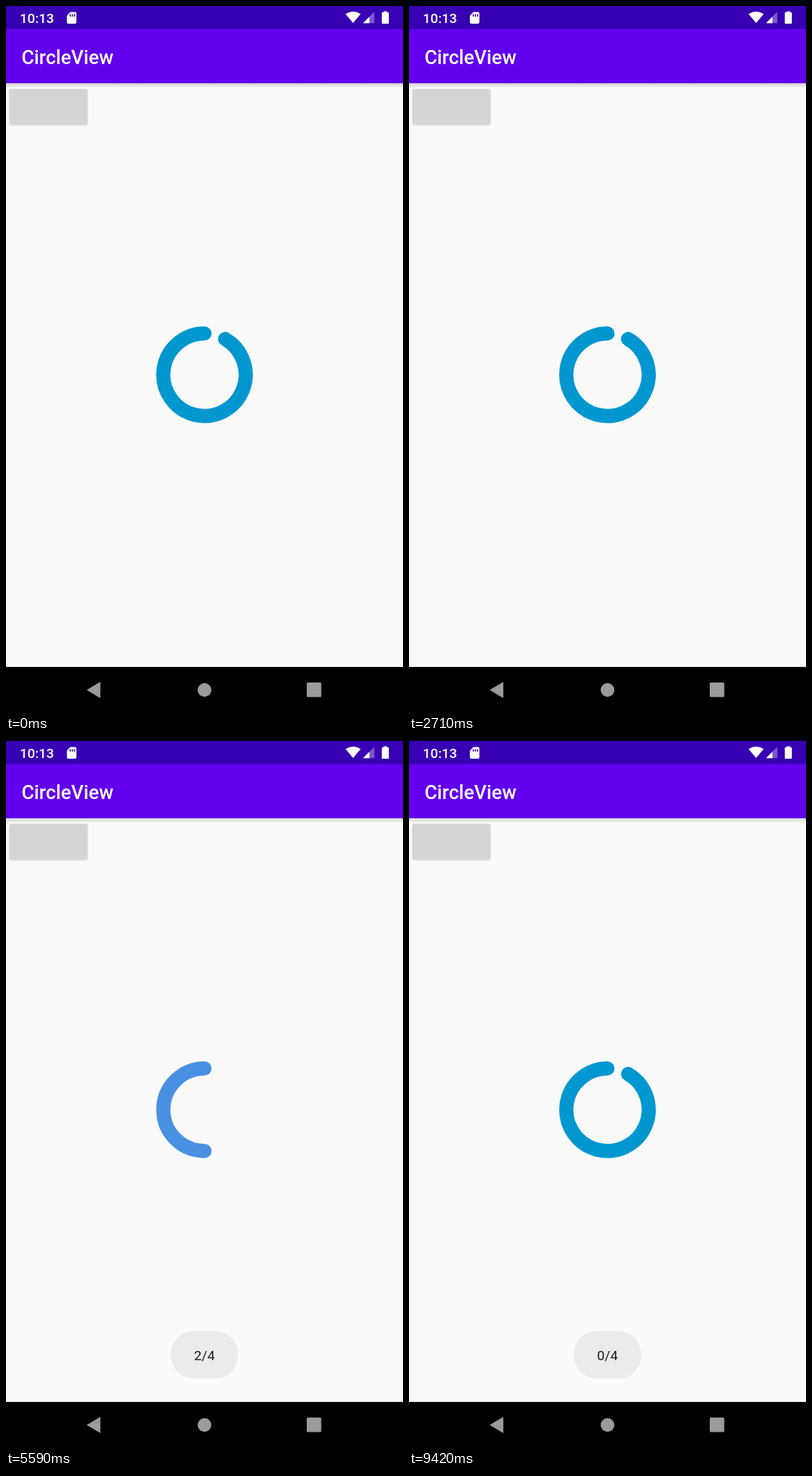
Animation of 561 by 998 pixels, one loop 9500 ms. Source, as an HTML page:

```html
<!DOCTYPE html>
<html lang="en">
<head>
<meta charset="utf-8">
<title>CircleView</title>
<style>
  html, body { margin: 0; width: 100%; height: 100%; overflow: hidden; background: #fafafa; }
  svg { display: block; width: 561px; height: 998px; font-family: Roboto, sans-serif; }
</style>
</head>
<body>
<svg viewBox="0 0 561 998">
  <defs>
    <linearGradient id="shade" x2="0" y2="1">
      <stop stop-color="#000" stop-opacity=".16"/>
      <stop offset="1" stop-color="#000" stop-opacity="0"/>
    </linearGradient>
    <filter id="soft" x="-10%" y="-20%" width="120%" height="140%">
      <feDropShadow dx="0" dy="1.3" stdDeviation="1.3" flood-opacity=".25"/>
    </filter>
  </defs>

  <rect width="561" height="998" fill="#fafafa"/>
  <rect y="109" width="561" height="7" fill="url(#shade)"/>
  <rect y="32" width="561" height="77" fill="#6200ee"/>
  <rect width="561" height="32.5" fill="#3700b3"/>

  <g fill="#fff">
    <text x="19.5" y="24" font-size="19.1" font-weight="500">10:13</text>
    <path d="M91 8.5H97.5Q99.5 8.5 99.5 10.5V23Q99.5 25 97.5 25H88Q86 25 86 23V13.5Z"/>
    <path d="M90.8 11.5v3.5M93.8 11.5v3.5M96.8 11.5v3.5" stroke="#3700b3" stroke-width="1.5"/>
    <path d="M490.5 24L479.8 11.3Q490.5 4 501.2 11.3Z"/>
    <path d="M504.5 24.3L520.5 8.3V24.3Z" opacity=".35"/>
    <path d="M504.5 24.3L513.5 15.3V24.3Z"/>
    <path d="M533.5 9V7.5H538.5V9H540Q541 9 541 10V24Q541 25 540 25H532Q531 25 531 24V10Q531 9 532 9Z"/>
    <text x="22" y="81.5" font-size="27.3" font-weight="500">CircleView</text>
  </g>

  <rect id="button" x="5" y="117" width="110" height="49.5" rx="2.5" fill="#d5d5d5" filter="url(#soft)"/>
  <path id="ring" fill="none" stroke-linecap="round"/>

  <g id="toast" text-anchor="middle" font-size="19.1">
    <rect x="233" y="833" width="95" height="67" rx="32" fill="#ebebec"/>
    <text id="oldText" x="280.5" y="874" fill="#1c1c1c"/>
    <text id="newText" x="280.5" y="874" fill="#1c1c1c"/>
  </g>

  <rect y="933" width="561" height="65"/>
  <g fill="#9b9b9b">
    <path d="M114 965.5L133.3 954V977Z"/>
    <circle cx="280.5" cy="965.5" r="9.7"/>
    <rect x="425" y="955" width="20.5" height="20.5" rx="1.5"/>
  </g>
</svg>

<script>
const LOOP = 9500, GROW = 800, CX = 280.5, CY = 520.5, OUTER = 68.2, STROKE = 20;
const steps = [
  { at: -GROW, sweep: 330, color: '#0097d0', label: '' },
  { at: 3440, sweep: 90, color: '#ff0000', label: '1/4' },
  { at: 4720, sweep: 180, color: '#4a90e2', label: '2/4' },
  { at: 6135, sweep: 270, color: '#40c4ff', label: '3/4' },
  { at: 7412, sweep: 330, color: '#0097d0', label: '0/4' }
];
const [button, ring, toast, oldText, newText] =
  ['button', 'ring', 'toast', 'oldText', 'newText'].map(id => document.getElementById(id));

const clamp = x => Math.min(1, Math.max(0, x));
const overshoot = t => (t - 1) ** 2 * (3 * (t - 1) + 2) + 1;

function arcPath(r, degrees) {
  const point = deg => {
    const a = deg * Math.PI / 180;
    return `${CX - r * Math.sin(a)} ${CY - r * Math.cos(a)}`;
  };
  const half = `A${r} ${r} 0 0 0 `;
  const end = Math.min(degrees, 360);
  return `M${point(0)}${half}${point(end / 2)}${half}${point(end)}`;
}

function drawRing(step, t) {
  const f = overshoot(clamp((t - step.at) / GROW));
  const width = STROKE * f;
  ring.setAttribute('d', arcPath(OUTER - width / 2, step.sweep * f));
  ring.setAttribute('stroke', step.color);
  ring.setAttribute('stroke-width', width);
}

function drawToast(index, t) {
  const fade = clamp((t - steps[index].at - 90) / 270);
  toast.style.opacity = index === 0 ? 0 : index === 1 ? fade : 1;
  oldText.textContent = index > 1 ? steps[index - 1].label : '';
  newText.textContent = steps[index].label;
  oldText.style.opacity = 1 - fade;
  newText.style.opacity = index > 1 ? fade : 1;
}

function drawButton(t) {
  const press = Math.max(...steps.slice(1).map(({ at }) =>
    Math.min(clamp((t - at + 70) / 100), clamp((at + 430 - t) / 230))));
  const shade = Math.round(213 - 12 * press);
  button.setAttribute('fill', `rgb(${shade},${shade},${shade})`);
}

function frame(now) {
  const t = now % LOOP;
  const index = steps.findLastIndex(step => t >= step.at);
  drawRing(steps[index], t);
  drawToast(index, t);
  drawButton(t);
  requestAnimationFrame(frame);
}
frame(performance.now());
</script>
</body>
</html>
```
